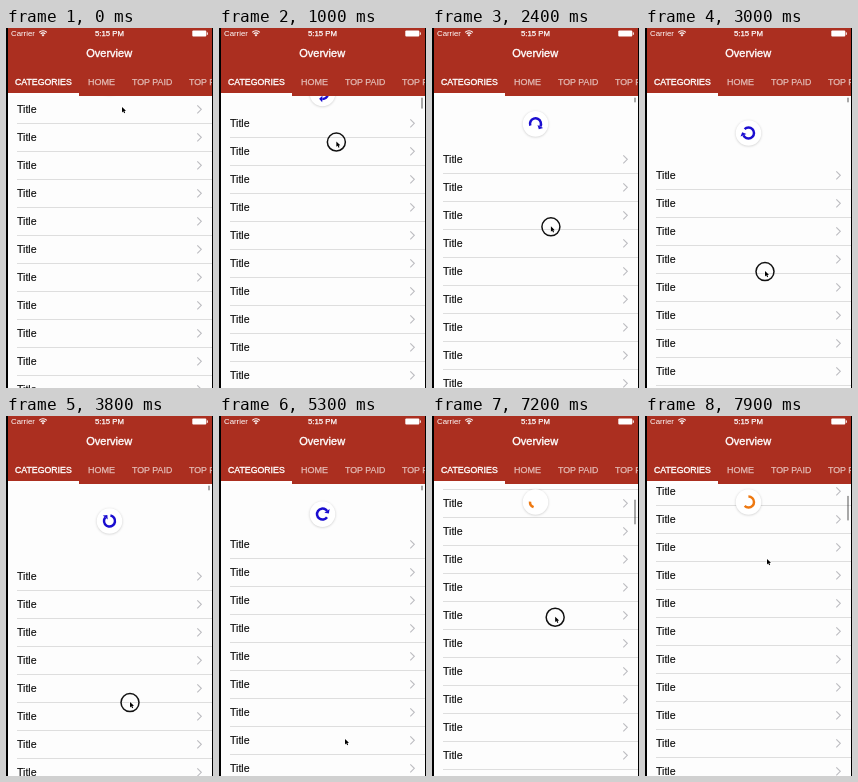
Recreate the animation shown at these times as an HTML page with a canvas. Size 207 by 360 pixels, loop 8 s.

```html
<!DOCTYPE html>
<html lang="en">
<head>
<meta charset="utf-8">
<title>Pull to refresh</title>
<style>
html, body { margin: 0; width: 100%; height: 100%; overflow: hidden; background: #fff; }
canvas { display: block; width: 207px; height: 360px; }
</style>
</head>
<body>
<canvas id="stage"></canvas>
<script>
const W = 207, H = 360, LOOP = 8000, STEP = 100;
const TOP = 67, BAR = 68, ROW = 28, RED = '#ab2f20';
const RELEASE = 5150, SPIN = 5673, CYCLE = 1333;
const COLORS = [[26, 13, 208], [211, 32, 20], [238, 120, 16], [40, 150, 60]];

const canvas = document.getElementById('stage');
const ctx = canvas.getContext('2d');
const dpr = window.devicePixelRatio || 1;
canvas.width = W * dpr;
canvas.height = H * dpr;

const clamp = (v, a, b) => Math.max(a, Math.min(b, v));
const smooth = u => u * u * (3 - 2 * u);
const rad = d => d * Math.PI / 180;
const between = (t, a, b) => t >= a && t < b;

// Piecewise linear value from [time, value] pairs
function track(keys, t) {
  for (let i = 1; i < keys.length; i++) {
    const [t0, a] = keys[i - 1], [t1, b] = keys[i];
    if (t <= t1) return a + (b - a) * (t - t0) / (t1 - t0);
  }
  return keys[keys.length - 1][1];
}

const cursorX = [[0, 116], [500, 117], [1900, 118], [3000, 120], [3800, 124], [5150, 126],
  [5650, 126], [6350, 119], [6700, 119], [7300, 124], [7900, 122], [8000, 121]];
const cursorY = [[0, 79], [500, 87], [1900, 161], [3000, 243], [3800, 286], [5150, 322],
  [5300, 323], [5650, 323], [6350, 129], [6700, 129], [7300, 215], [7900, 143], [8000, 138]];
const scrollKeys = [[5650, 0], [6350, -194], [6500, -224], [6700, -234], [7300, -148],
  [7900, -118], [8000, -116]];

// Rubber band resistance for a finger at height y
function pull(y) {
  const d = Math.max(0, y - 87) * 0.547;
  return d / (d / (H - TOP) + 1);
}

function settle(x) {
  return x < 0 ? 1 : (1 + x) * Math.exp(-x);
}

function listOffset(t) {
  if (t < RELEASE) return pull(track(cursorY, t));
  const bounce = pull(322) * settle((t - RELEASE) * 0.0107);
  return t < 5650 ? bounce : bounce + track(scrollKeys, t);
}

function text(str, x, y, size, color, weight = 0, align = 'left') {
  ctx.font = size + 'px "Liberation Sans", Arial, sans-serif';
  ctx.textAlign = align;
  ctx.fillStyle = ctx.strokeStyle = color;
  ctx.fillText(str, x, y);
  if (weight) {
    ctx.lineWidth = weight;
    ctx.strokeText(str, x, y);
  }
}

function drawList(off) {
  const first = Math.max(0, Math.floor(-off / ROW));
  for (let i = first; ; i++) {
    const y = TOP + Math.round(off) + i * ROW;
    if (y > H) break;
    text('Title', 11, y + 18, 10.6, '#111', 0.15);
    ctx.fillStyle = '#dedede';
    ctx.fillRect(11, y + ROW, 195, 1);
    ctx.strokeStyle = '#bcbcc0';
    ctx.lineWidth = 1.1;
    ctx.beginPath();
    ctx.moveTo(191.3, y + 10.3);
    ctx.lineTo(195.3, y + 14.3);
    ctx.lineTo(191.3, y + 18.3);
    ctx.stroke();
  }
}

function drawScrollBar(t, off) {
  if (t < 500) return;
  const len = off > 0 ? Math.max(5, 25 - off) : 25;
  ctx.fillStyle = 'rgba(0,0,0,0.42)';
  ctx.beginPath();
  ctx.roundRect(202.2, 69.5 + Math.max(0, -off) * 0.086, 1.6, len, 0.8);
  ctx.fill();
}

function spinnerColor(t) {
  if (t < SPIN) return COLORS[0];
  const c = (t - SPIN) / CYCLE, n = Math.floor(c);
  const a = COLORS[(n + 1) % 4], b = COLORS[(n + 2) % 4];
  const mix = clamp((c - n - 0.75) * 4, 0, 1);
  return a.map((v, i) => Math.round(v + (b[i] - v) * mix));
}

// Start angle and sweep in degrees
function spinnerArc(t, off) {
  if (t < RELEASE) {
    return [102 + (off - 36) * 4.1, clamp(170 + (off - 36) * 4, 10, 300)];
  }
  if (t < SPIN) {
    return [track([[RELEASE, 321], [5300, 395], [SPIN, 726]], t),
      track([[RELEASE, 300], [5300, 290], [SPIN, 15]], t)];
  }
  const c = (t - SPIN) / CYCLE, n = Math.floor(c), p = c - n;
  const grow = smooth(clamp(p * 2, 0, 1));
  const shrink = smooth(clamp(p * 2 - 1, 0, 1));
  return [6 + 288 * (n + shrink) + 154 * c, 15 + 288 * (grow - shrink)];
}

function drawSpinner(t, off) {
  const y = t < RELEASE ? Math.min(105, 54 + off * 0.83)
    : 86 + 19 * settle((t - RELEASE) * 0.0085);
  const x = 103.5, r = 5.5;
  ctx.save();
  ctx.shadowColor = 'rgba(0,0,0,0.2)';
  ctx.shadowBlur = 2.5 * dpr;
  ctx.shadowOffsetY = 0.5 * dpr;
  ctx.fillStyle = '#fff';
  ctx.beginPath();
  ctx.arc(x, y, 12.8, 0, Math.PI * 2);
  ctx.fill();
  ctx.restore();

  const [tail, sweep] = spinnerArc(t, off);
  const head = rad(tail + sweep);
  ctx.strokeStyle = ctx.fillStyle = 'rgb(' + spinnerColor(t) + ')';
  ctx.lineWidth = 2.5;
  ctx.beginPath();
  ctx.arc(x, y, r, rad(tail), head);
  ctx.stroke();
  if (t < SPIN) {
    const s = t < 5300 ? 1 : (SPIN - t) / (SPIN - 5300);
    ctx.save();
    ctx.translate(x, y);
    ctx.rotate(head);
    ctx.beginPath();
    ctx.moveTo(r - 3.2 * s, 0);
    ctx.lineTo(r + 3.2 * s, 0);
    ctx.lineTo(r, 3.2 * s);
    ctx.fill();
    ctx.restore();
  }
}

function drawHeader() {
  ctx.fillStyle = RED;
  ctx.fillRect(0, 0, W, BAR);

  text('Carrier', 5, 8, 7.8, '#fff');
  text('5:15 PM', 103.5, 8, 7.8, '#fff', 0.25, 'center');
  text('Overview', 103.2, 29.3, 11, '#fff', 0.35, 'center');

  ctx.strokeStyle = ctx.fillStyle = '#fff';
  ctx.lineWidth = 1.1;
  for (const r of [3.3, 5.4]) {
    ctx.beginPath();
    ctx.arc(37, 8.2, r, rad(-135), rad(-45));
    ctx.stroke();
  }
  ctx.beginPath();
  ctx.moveTo(37, 8.4);
  ctx.arc(37, 8.4, 2, rad(-135), rad(-45));
  ctx.fill();

  ctx.beginPath();
  ctx.roundRect(186.3, 2.6, 14, 6, 1);
  ctx.fill();
  ctx.fillRect(200.8, 4.4, 1, 2.4);

  text('CATEGORIES', 9, 56.8, 8.75, '#fff', 0.35);
  const dim = '#e3bcb6';
  text('HOME', 82, 56.8, 9, dim, 0.25);
  text('TOP PAID', 126, 56.8, 8.8, dim, 0.25);
  text('TOP FREE', 183, 56.8, 8.8, dim, 0.25);
  ctx.fillStyle = '#fff';
  ctx.fillRect(2, 65, 71, BAR - 65);
}

function drawCursor(t) {
  const x = track(cursorX, t), y = track(cursorY, t);
  const down = between(t, 500, RELEASE) || between(t, 5650, 6350) || between(t, 6700, 7300);
  if (down) {
    ctx.strokeStyle = '#111';
    ctx.lineWidth = 1.5;
    ctx.beginPath();
    ctx.arc(x, y + 0.6, 9, 0, Math.PI * 2);
    ctx.stroke();
  }
  ctx.save();
  ctx.translate(x, y);
  ctx.scale(0.9, 0.9);
  ctx.beginPath();
  ctx.moveTo(0, 0);
  ctx.lineTo(0, 6);
  ctx.lineTo(1.4, 4.8);
  ctx.lineTo(2.4, 7);
  ctx.lineTo(3.5, 6.5);
  ctx.lineTo(2.6, 4.4);
  ctx.lineTo(4.4, 4.3);
  ctx.closePath();
  ctx.strokeStyle = '#fff';
  ctx.lineWidth = 1;
  ctx.stroke();
  ctx.fillStyle = '#000';
  ctx.fill();
  ctx.restore();
}

function draw(t) {
  const off = listOffset(t);
  ctx.setTransform(dpr, 0, 0, dpr, 0, 0);
  ctx.fillStyle = '#fdfdfd';
  ctx.fillRect(0, 0, W, H);
  drawList(off);
  drawScrollBar(t, off);
  drawSpinner(t, off);
  drawHeader();
  ctx.fillStyle = '#000';
  ctx.fillRect(0, 0, 2, H);
  ctx.fillRect(206, 0, 1, H);
  drawCursor(t);
}

const start = performance.now();
function tick(now) {
  const t = Math.max(0, now - start) % LOOP;
  draw(Math.floor(t / STEP) * STEP);
  requestAnimationFrame(tick);
}
draw(0);
requestAnimationFrame(tick);
</script>
</body>
</html>
```
